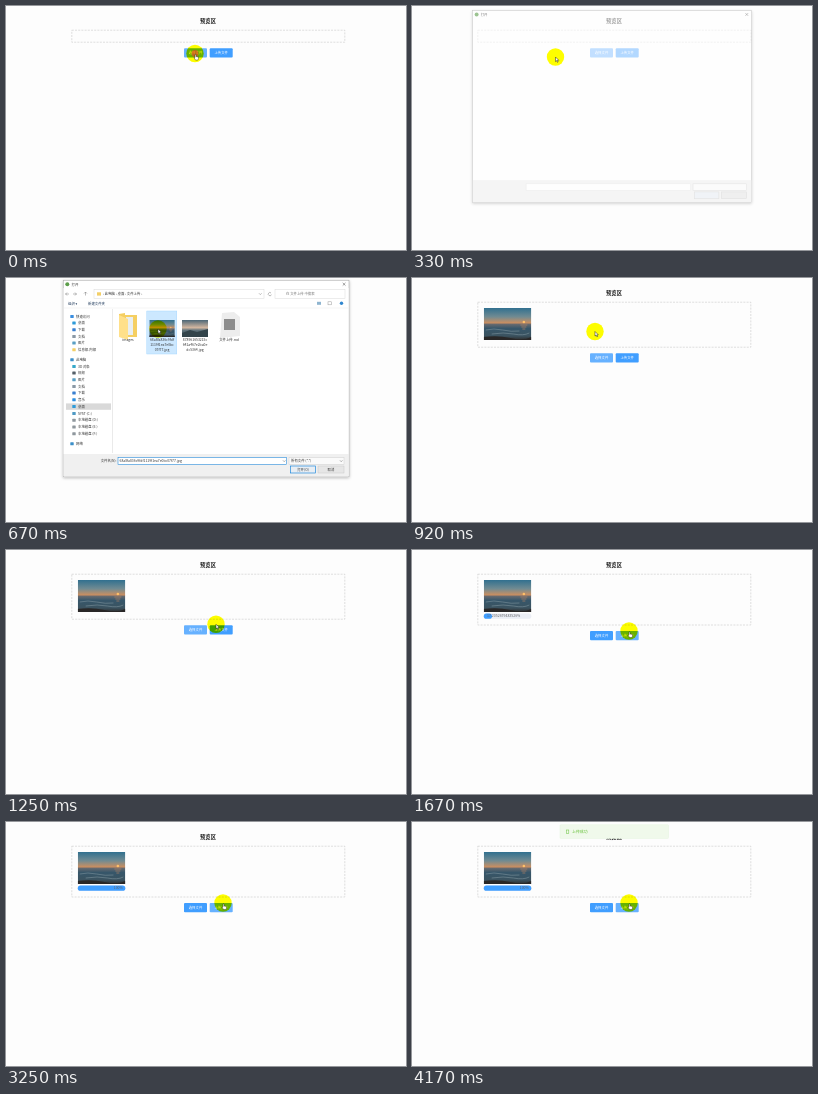
These frames come from a looping animation (400x244 px, 4.41 s). An HTML page:

```html
<!DOCTYPE html>
<html lang="zh">
<head>
<meta charset="utf-8">
<style>
  html, body { margin: 0; width: 100%; height: 100%; overflow: hidden; background: #fdfdfd; }
  svg { display: block; width: 100vw; height: 100vh; font-family: "Noto Sans CJK SC", "Noto Sans CJK", "Noto Sans", sans-serif; }
  #halo { mix-blend-mode: multiply; }
</style>
</head>
<body>
<svg id="stage" viewBox="0 0 400 244" xmlns="http://www.w3.org/2000/svg"></svg>
<script>
const LOOP = 4410, STEP = 1000 / 12;
const BAR = 47.5;
const BLUE = '#409eff', LIGHT_BLUE = '#66b1ff';

const rect = (x, y, w, h, fill, more = '') =>
  `<rect x="${x}" y="${y}" width="${w}" height="${h}" fill="${fill}" ${more}/>`;
const path = (d, stroke, width = 0.5, fill = 'none') =>
  `<path d="${d}" stroke="${stroke}" stroke-width="${width}" fill="${fill}"/>`;
// y is the vertical middle of the line
const text = (x, y, s, { size = 3.4, fill = '#333', anchor = 'start', more = '' } = {}) =>
  `<text x="${x}" y="${y + size * 0.36}" font-size="${size}" fill="${fill}" text-anchor="${anchor}" ${more}>${s}</text>`;
const middle = { anchor: 'middle' };

const button = (id, x, label) =>
  rect(x, 0, 23, 9.3, BLUE, `id="${id}" rx="1"`) +
  text(x + 11.5, 4.6, label, { fill: '#fff', anchor: 'middle' });

const defs = `<defs>
  <linearGradient id="sky" x2="0" y2="1">
    <stop stop-color="#31708f"/><stop offset=".55" stop-color="#718b92"/><stop offset="1" stop-color="#d98f58"/>
  </linearGradient>
  <linearGradient id="sea" x2="0" y2="1">
    <stop stop-color="#6f6d70"/><stop offset=".3" stop-color="#36566a"/><stop offset=".75" stop-color="#3b5360"/><stop offset="1" stop-color="#2e2c2c"/>
  </linearGradient>
  <linearGradient id="dusk" x2="0" y2="1">
    <stop stop-color="#4c6676"/><stop offset=".45" stop-color="#d3b7a0"/><stop offset=".6" stop-color="#63757d"/><stop offset="1" stop-color="#2c414c"/>
  </linearGradient>
  <filter id="shadow" x="-10%" y="-10%" width="120%" height="120%">
    <feDropShadow dx="0" dy="1" stdDeviation="1.6" flood-opacity=".3"/>
  </filter>
  <symbol id="sunset" viewBox="0 0 48 32" preserveAspectRatio="none">
    ${rect(0, 0, 48, 16, 'url(#sky)')}${rect(0, 15.5, 48, 16.5, 'url(#sea)')}
    <circle cx="40.5" cy="14" r="1.3" fill="#ffc069"/>
    ${path('M37 17H44M38 19H43M39 21H42', '#c58a62', 0.6)}
    ${path('M2 22Q10 20 19 22T36 23M8 26Q20 24 30 26T46 25', '#7b929b', 0.6)}
    ${path('M0 29Q14 27 27 30T48 29V32H0Z', 'none', 0, '#292727')}
  </symbol>
</defs>`;

const page = rect(0, 0, 400, 244, '#fdfdfd') +
  text(202, 15.2, '预览区', { size: 5.3, fill: '#222', anchor: 'middle', more: 'font-weight="700"' }) +
  rect(65.8, 24.2, 273, 12, 'none', 'id="box" stroke="#c8c8c8" stroke-width=".6" stroke-dasharray="2 1.2"') +
  `<use id="photo" href="#sunset" x="71.8" y="30" width="47.5" height="32"/>
  <g id="progress">
    ${rect(71.8, 63.6, BAR, 5.2, '#ebeef5', 'rx="2.6"')}
    ${rect(71.8, 63.6, 0, 5.2, BLUE, 'id="fill" rx="2.6"')}
    ${text(75, 66.2, '', { size: 3.5, fill: '#606266', more: 'id="percent"' })}
  </g>
  <g id="buttons">${button('choose', 178, '选择文件')}${button('upload', 203.7, '上传文件')}</g>`;

const sidebar = [
  [38.5, '快速访问', '#3a8ee0'], [45, '桌面', '#2f9bd8', 2], [51.7, '下载', '#3a7fd0', 2], [58.4, '文档', '#8a98a5', 2],
  [65.1, '图片', '#5a9fc4', 2], [71.8, '信息部-内部', '#f3cf67', 2], [81.8, '此电脑', '#3c8fc8'],
  [88.4, '3D 对象', '#35a8c9', 2], [95, '视频', '#555f68', 2], [101.7, '图片', '#5a9fc4', 2], [108.4, '文档', '#8a98a5', 2],
  [115, '下载', '#3a7fd0', 2], [121.8, '音乐', '#2d8ee0', 2], [128.5, '桌面', '#2f9bd8', 2], [135.4, 'SYST (C:)', '#4f9ac4', 2],
  [142.2, '本地磁盘 (D:)', '#8f979d', 2], [149, '本地磁盘 (E:)', '#8f979d', 2], [155.8, '本地磁盘 (F:)', '#8f979d', 2],
  [165.8, '网络', '#3c8fc8'],
].map(([y, label, color, indent = 0]) =>
  rect(64.3 + indent, y - 1.5, 3.4, 3, color, 'rx=".5"') + text(70 + indent, y, label)).join('');

const lines = (x, rows) => rows.map((s, i) => text(x, 62 + i * 5, s, middle)).join('');

const listing = rect(57.5, 10, 285, 166, '#fff') +
  path('M63 16H59.5M61 14.5L59.5 16L61 17.5M67 16H70.5M69 14.5L70.5 16L69 17.5M79.5 17.5V14M78 15.5L79.5 14L81 15.5', '#777') +
  rect(88, 11.3, 170, 9.4, '#fff', 'stroke="#d9d9d9" stroke-width=".5"') +
  rect(91, 14.3, 4, 3.3, '#f3cf67') +
  text(97, 16, '› 此电脑 › 桌面 › 文件上传 ›') +
  path('M253 15.3L254.3 16.6L255.6 15.3M265 15A1.6 1.6 0 1 0 265.4 16.6', '#777') +
  rect(269, 11.3, 70, 9.4, '#fff', 'stroke="#d9d9d9" stroke-width=".5"') +
  text(280, 16, '在 文件上传 中搜索', { fill: '#777' }) +
  text(62, 25.3, '组织 ▾', { fill: '#1e395b' }) + text(82, 25.3, '新建文件夹', { fill: '#1e395b' }) +
  rect(311, 23.8, 4, 3, '#8fb5d0') + rect(322, 23.8, 3.5, 3, '#fff', 'stroke="#999" stroke-width=".5"') +
  '<circle cx="335.5" cy="25.3" r="1.7" fill="#2f86cf"/>' +
  path('M58 30H342.5', '#e8e8e8') +
  rect(60, 125.4, 45, 6.4, '#d9d9d9') + sidebar +
  path('M106.5 31V175', '#e5e5e5', 0.8) +
  path('M113 36L119 35V37H131V59H113Z', 'none', 0, '#f5cf62') +
  rect(120, 39, 7, 18, '#e9eef0') + path('M113 37L122 41V62L113 59Z', 'none', 0, '#ffe08a') +
  text(122, 62, 'images', middle) +
  rect(140.8, 33, 30, 43, '#cce8ff', 'id="selection" stroke="#99d1ff" stroke-width=".4"') +
  '<use href="#sunset" x="143.3" y="42" width="25.5" height="17"/>' +
  lines(156, ['68a8fa836c9fdf', '1119f1ea7e0bc', '07f77.jpg']) +
  rect(176, 42, 26, 17, 'url(#dusk)') + path('M176 55L184 52L191 54L202 51V59H176Z', 'none', 0, '#33444b') +
  lines(189, ['878961653215c', '642a467e2ba0e', 'dc5364.jpg']) +
  path('M216 35L228 34L234 39V58L214 60Z', 'none', 0, '#ededed') + rect(218, 41, 11, 11, '#8d8d8d') +
  text(223, 62, '文件上传.md', middle);

const dialog = `<g id="dialog">
  ${rect(57.2, 2.2, 285.8, 196.6, '#fff', 'stroke="#9b9b9b" stroke-width=".5" filter="url(#shadow)"')}
  <circle cx="61.3" cy="6.3" r="2" fill="#5c9e4a"/>
  ${text(65.5, 6.3, '打开')}
  ${path('M336.7 4.8L339.5 7.6M339.5 4.8L336.7 7.6', '#444')}
  <g id="listing">${listing}</g>
  ${rect(57.5, 176, 285.2, 22.5, '#f0f0f0')}
  ${rect(112, 179.7, 168.5, 6.6, '#fff', 'id="field" stroke="#e0e0e0" stroke-width=".5"')}
  ${rect(283, 179.7, 55, 6.6, '#fafafa', 'stroke="#d0d0d0" stroke-width=".5"')}
  ${rect(284.5, 188, 25, 7, '#e8eef4', 'id="open" stroke="#d0d0d0" stroke-width=".6"')}
  ${rect(312, 188, 26, 7, '#e6e6e6', 'stroke="#c8c8c8" stroke-width=".5"')}
  <g id="labels">
    ${text(110.5, 183, '文件名(N):', { anchor: 'end' })}
    ${text(113.5, 183, '68a8fa836c9fdf1119f1ea7e0bc07f77.jpg', { more: 'id="filename"' })}
    ${text(285, 183, '所有文件 (*.*)')}
    ${path('M277 182.4L278.2 183.6L279.4 182.4M334 182.4L335.2 183.6L336.4 182.4', '#555')}
    ${text(297, 191.5, '打开(O)', middle)}${text(325, 191.5, '取消', middle)}
  </g>
</g>`;

const message = `<g id="message">
  ${rect(148, 2.7, 108.5, 13.8, '#f0f9eb', 'rx="1" stroke="#e1f3d8" stroke-width=".4"')}
  ${rect(154.6, 8, 2.2, 3.6, 'none', 'stroke="#67c23a" stroke-width=".5"')}
  ${text(160, 9.8, '上传成功', { size: 3.9, fill: '#67c23a' })}
</g>`;

const pointer = `<circle id="halo" r="8.7" fill="#ff0"/>
<g id="pointer">
  <circle id="press" r="3.4" fill="#f33" opacity=".55"/>
  <g id="arrow">${path('M0 0V4.6L1.1 3.6L1.9 5.3L2.6 5L1.9 3.3H3.3Z', '#222', 0.5, '#fff')}</g>
  <g id="hand">${path('M0 1.2Q.6 .6 1.1 1.2V3L3.5 3.5V5.2L2.8 6.6H.6L-1 4.2L0 4Z', '#222', 0.45, '#fff')}</g>
</g>`;

document.getElementById('stage').innerHTML = defs + page + dialog + message + pointer;

const $ = id => document.getElementById(id);
const set = (id, attrs) => { for (const k in attrs) $(id).setAttribute(k, attrs[k]); };
const show = (id, on) => set(id, { visibility: on ? 'inherit' : 'hidden' });

// Linear interpolation through rows of [step, ...values]
function along(keys, n) {
  const i = keys.findIndex(k => k[0] > n);
  if (i < 0) return keys[keys.length - 1].slice(1);
  if (i === 0) return keys[0].slice(1);
  const a = keys[i - 1], b = keys[i], f = (n - a[0]) / (b[0] - a[0]);
  return a.slice(1).map((v, j) => v + (b[j + 1] - v) * f);
}

const cursorPath = [[0, 189, 47.5], [1, 187, 47.5], [4, 143.5, 51], [6, 152, 51], [8, 152, 51],
  [9, 157, 51], [11, 183, 53.5], [14, 203, 67.5], [16, 217, 81]];
const dialogFade = [[2, 0], [3, 0.15], [4, 0.6], [5, 1], [8, 1], [9, 0.5], [10, 0]];
const progressKeys = [[18, 0], [20, 17.2052679483526], [28, 62.7184365210943], [32, 84], [35, 94], [39, 100]];
const messageKeys = [[46, 0], [47, 0.25], [48, 0.65], [49, 0.9], [50, 1]];

function draw(n) {
  const [x, y] = along(cursorPath, n);
  set('halo', { cx: x, cy: y });
  set('pointer', { transform: `translate(${x} ${y})` });
  const overButton = n < 2 || n >= 16;
  show('arrow', !overButton);
  show('hand', overButton);
  show('press', n === 0 || n === 17);

  const hasPhoto = n >= 10, uploading = n >= 18;
  const boxHeight = uploading ? 50.8 : hasPhoto ? 45 : 12;
  set('box', { height: boxHeight });
  set('buttons', { transform: `translate(0 ${boxHeight + 30.2})` });
  set('choose', { fill: n < 16 ? LIGHT_BLUE : BLUE });
  set('upload', { fill: n < 16 ? BLUE : LIGHT_BLUE });
  show('photo', hasPhoto);
  show('progress', uploading);

  const [p] = along(progressKeys, n), width = BAR * p / 100;
  const done = n >= 31;
  set('fill', { width });
  $('percent').textContent = done ? '100%' : p.toFixed(13) + '%';
  const rightAligned = done || width > 39;
  set('percent', { x: rightAligned ? 71.8 + width - 2.5 : 75, 'text-anchor': rightAligned ? 'end' : 'start' });

  const [fade] = along(dialogFade, n), scale = 0.94 + 0.06 * fade;
  set('dialog', { opacity: fade, transform: `translate(200 100.5) scale(${scale}) translate(-200 -100.5)` });
  show('dialog', fade > 0);
  const loaded = n >= 5, picked = n >= 7;
  show('listing', loaded);
  show('labels', loaded);
  show('selection', n >= 6);
  show('filename', picked);
  set('field', { stroke: loaded ? '#0078d7' : '#e0e0e0' });
  set('open', { stroke: loaded ? '#0078d7' : '#d0d0d0' });

  const [shown] = along(messageKeys, n);
  set('message', { opacity: shown, transform: `translate(0 ${-14 * (1 - shown)})` });
}

function tick() {
  draw(Math.floor((performance.now() % LOOP + 5) / STEP));
  requestAnimationFrame(tick);
}
tick();
</script>
</body>
</html>
```
